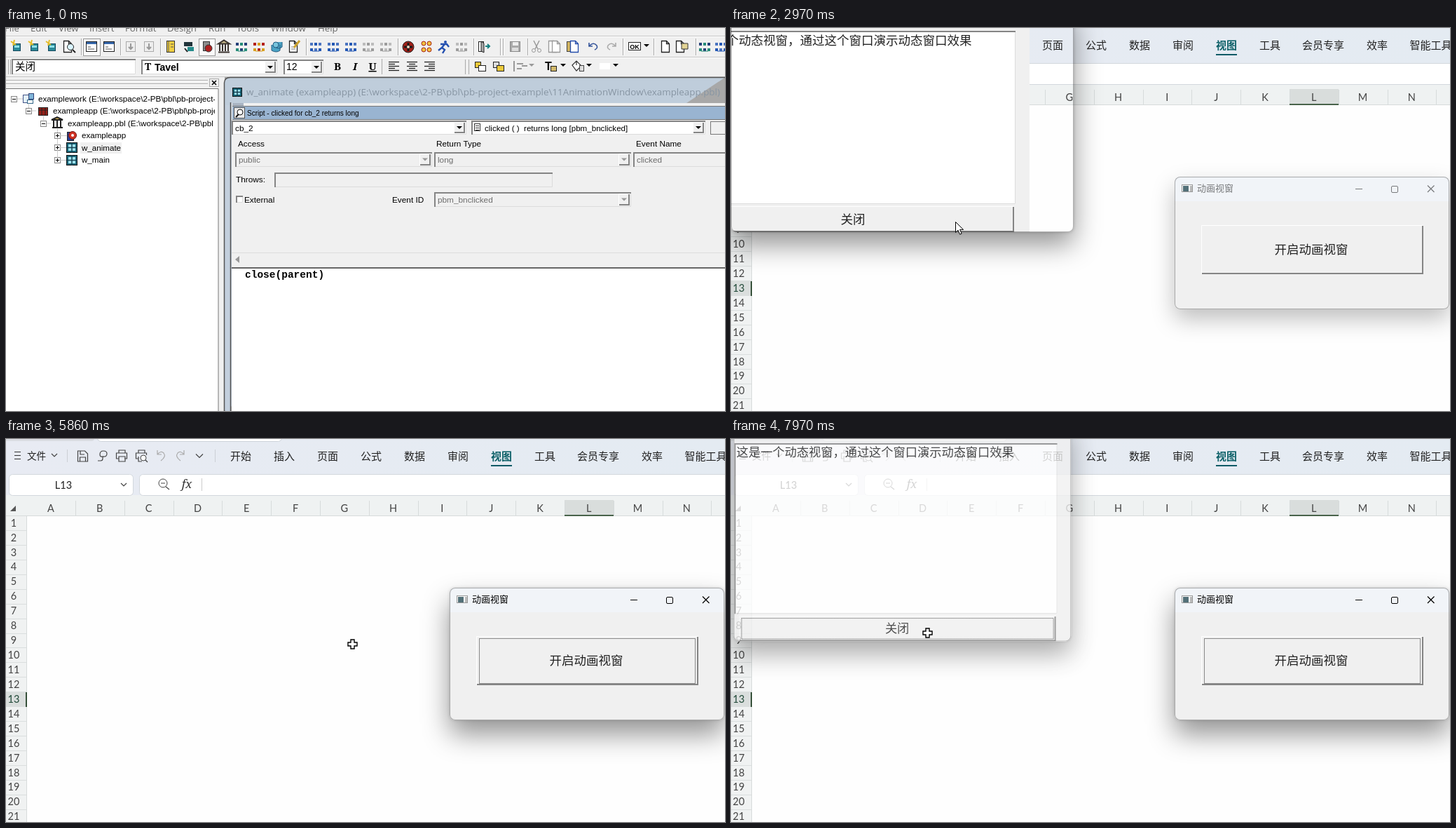
Recreate the animation shown at these times as an HTML page. Size 1026 px wide and 546 px high, loop 8000 ms.

```html
<!DOCTYPE html>
<html lang="zh">
<head>
<meta charset="utf-8">
<title>Window animation demo</title>
<style>
html, body { margin: 0; width: 100%; height: 100%; overflow: hidden; background: #fff; }
svg { position: absolute; left: 0; top: 0; overflow: visible; }
text { white-space: pre; }
.ui { font-family: "Liberation Sans", sans-serif; }
.cjk { font-family: "Noto Sans CJK SC", "Noto Sans CJK", sans-serif; }
.win { position: absolute; border-radius: 8px; }
.clip { position: absolute; inset: 0; border-radius: 8px; overflow: hidden; }
.edge { position: absolute; inset: 0; border-radius: 8px; box-shadow: inset 0 0 0 1px rgba(0,0,0,.3); }
#dialog { left: 633px; top: 212px; width: 392px; height: 189px; }
#popup { left: 0; top: -30px; width: 489px; height: 321px; box-shadow: 0 18px 38px rgba(0,0,0,.42), 0 0 4px rgba(0,0,0,.2); }
#content { position: absolute; inset: 0; }
</style>
</head>
<body>
<svg id="ide" class="ui" width="1026" height="546"></svg>
<svg id="sheet" width="1026" height="546"></svg>
<div id="dialog" class="win"><div class="clip"><svg id="dialogArt" class="cjk" width="392" height="189"></svg></div><div class="edge"></div></div>
<div id="popup" class="win"><div class="clip"><div id="content"><svg id="popupArt" class="cjk" width="489" height="321"></svg></div></div><div class="edge"></div></div>
<svg id="mouse" width="1" height="1"></svg>
<script>
const $ = id => document.getElementById(id);
const R = (x, y, w, h, fill, stroke, more = '') => {
  const o = stroke ? .5 : 0;
  return `<rect x="${x + o}" y="${y + o}" width="${w - 2 * o}" height="${h - 2 * o}" fill="${fill}" ${stroke ? `stroke="${stroke}"` : ''} ${more}/>`;
};
const P = (d, stroke = '#333', width = 1, fill = 'none') =>
  `<path d="${d}" stroke="${stroke}" stroke-width="${width}" fill="${fill}"/>`;
const C = (x, y, r, fill, stroke = 'none') => `<circle cx="${x}" cy="${y}" r="${r}" fill="${fill}" stroke="${stroke}"/>`;
const T = (x, y, s, size, fill = '#000', more = '') =>
  `<text x="${x}" y="${y}" font-size="${size}" fill="${fill}" ${more}>${s}</text>`;
const MID = 'text-anchor="middle"', BOLD = 'font-weight="700"';

// Classic 3D edges
const sunken = (x, y, w, h, fill = '#fff') => R(x, y, w, h, fill) +
  P(`M${x + 1} ${y + h}V${y + 1}H${x + w}`, '#858585', 2) + P(`M${x + 2} ${y + h - .5}H${x + w - .5}V${y + 2}`, '#dcdcdc');
const raised = (x, y, w, h) => R(x, y, w, h, '#f0f0f0') +
  P(`M${x + .5} ${y + h}V${y + .5}H${x + w}`, '#fff') + P(`M${x + 1} ${y + h - 1}H${x + w - 1}V${y + 1}`, '#858585', 2);
const arrow = (x, y, c = '#000') => P(`M${x - 4} ${y - 2}h8l-4 4z`, 'none', 0, c);
const combo = (x, y, w, h, s, off) => sunken(x, y, w, h, off ? '#f0f0f0' : '#fff') +
  raised(x + w - 18, y + 2, 16, h - 4) + arrow(x + w - 10, y + h / 2, off ? '#999' : '#000') +
  T(x + 5, y + h / 2 + 4.5, s, 11.8, off ? '#6d6d6d' : '#000');
const chevron = (x, y, r = 4) => P(`M${x - r} ${y - r / 2}l${r} ${r}l${r} ${-r}`, '#444', 1.2);

// Toolbar icons, drawn around (x, 27)
const dots = (x, a, b) => [0, 1, 2, 3, 4, 5].map(i =>
  R(x - 8 + i % 3 * 6, 21 + (i / 3 | 0) * 8, 4, 4, i % 2 ? a : b)).join('') + P(`M${x - 5} 33h10`, a);
const page = (x, c = '#222') => P(`M${x - 5.5} 18.5h7l4 4v12h-11zM${x + 1.5} 18.5v4h4`, c, 1.3, '#fff');
const icons = {
  n: x => R(x - 5, 22, 11, 11, '#2a8a98', '#184a60') + R(x - 3, 25, 7, 3, '#8fe0e8') + P(`M${x - 8} 19l7 5M${x - 3} 17l-2 8`, '#e6bd28', 2),
  m: x => page(x - 2) + C(x + 2, 27, 4.5, '#d9f5ff', '#222') + P(`M${x + 5} 31l4 4`, '#222', 2),
  w: x => R(x - 8, 19, 16, 15, '#fff', '#222') + R(x - 7, 20, 14, 3, '#3566aa') + P(`M${x - 5} 27h4M${x - 5} 30h9`, '#555'),
  x: x => R(x - 7, 19, 14, 15, '#eee', '#aaa') + P(`M${x} 22v8M${x - 3} 27l3 3l3-3`, '#999', 2),
  b: x => R(x - 6, 18, 12, 17, '#f0cf42', '#333') + P(`M${x - 3} 19v15M${x} 23h4M${x} 27h4`, '#555'),
  s: x => R(x - 7, 20, 12, 6, '#20333a') + R(x - 2, 27, 9, 6, '#258b8b') + P(`M${x - 6} 29l4 5`, '#222', 2),
  h: x => P(`M${x - 8} 22.5l8-5l8 5zM${x - 8} 34.5h16M${x - 6} 23v10M${x - 2} 23v10M${x + 2} 23v10M${x + 6} 23v10`, '#3b3430', 2, '#c9b98b'),
  t: x => R(x - 6, 19, 10, 14, '#8d8d8d', '#333') + C(x + 2, 29, 5, '#b02020', '#333'),
  g: x => dots(x, '#268c78', '#263f78'),
  a: x => dots(x, '#d8a020', '#b32018'),
  k: x => P(`M${x - 7} 24v8q7 4 12 0v-8M${x - 2} 20v7q6 4 10 0v-7`, '#245a80', 1, '#4aa3c4') + C(x - 1, 24, 4, '#77c4dc', '#245a80'),
  e: x => page(x - 1) + P(`M${x - 4} 27h6M${x - 4} 30h6`, '#777') + P(`M${x} 28l8-10`, '#cda32c', 3),
  d: x => dots(x, '#2458b4', '#4b74c0'),
  q: x => dots(x, '#9c9c9c', '#bcbcbc'),
  c: x => C(x, 27, 8, '#a32018', '#222') + P(`M${x - 6} 27h12M${x} 21v12`, '#1a1a1a', 3) + C(x, 27, 2, '#e6d6c0'),
  r: x => [[-4, 22], [4, 22], [-4, 31], [4, 31]].map(p => C(x + p[0], p[1], 3, '#f0c33d', '#a62018')).join(''),
  u: x => C(x + 3, 20, 2, '#2450b0') + P(`M${x + 2} 23l-4 5l4 3l-3 5M${x - 2} 28l-5 4M${x - 4} 23h9l3 4`, '#2450b0', 2.4),
  v: x => R(x - 7, 19, 8, 15, '#fff', '#222') + P(`M${x - 3} 19l4 3v13l-4-2z`, '#222', 1, '#aaa') + P(`M${x + 3} 26h6M${x + 6} 23l3 3l-3 3`, '#168080', 2),
  f: x => R(x - 7, 19, 15, 15, '#aaa', '#888') + R(x - 3, 20, 8, 5, '#eee') + R(x - 4, 28, 9, 5, '#ddd'),
  j: x => P(`M${x - 4} 18l6 12M${x + 4} 18l-6 12`, '#999', 1.5) + C(x - 4, 32, 2.5, 'none', '#999') + C(x + 4, 32, 2.5, 'none', '#999'),
  y: x => page(x - 2, '#999') + page(x + 3, '#999'),
  z: x => R(x - 8, 19, 13, 15, '#d2b45f', '#444') + page(x + 3, '#234caa'),
  l: x => P(`M${x - 6} 21v5h5M${x - 6} 26q6-7 11-1q2 4-3 6`, '#34549a', 1.6),
  o: x => P(`M${x + 6} 21v5h-5M${x + 6} 26q-6-7-11-1q-2 4 3 6`, '#aaa', 1.6),
  p: x => page(x),
  i: x => page(x - 3) + P(`M${x - 1} 22h9v8h-9z`, '#333', 1, '#e3d495')
};
const bar = '15n 40n 65n 90m 122w 147w 178x 204x 235b 261s 287t 311h 336g 361a 386k 411e 442d 467d 492d 517q 542q 574c 600r 624u 650q 681v 726f 757j 782y 808z 838l 864o 941p 965i 997g 1020d';

function drawIde() {
  const rule = x => P(`M${x + .5} 15v24`, '#aaa') + P(`M${x + 1.5} 15v24`, '#fff');
  let s = R(0, 0, 1026, 546, '#f0f0f0');
  s += '<g font-family="Open Sans, sans-serif">';
  'File:-2 Edit:35 View:75 Insert:119 Format:170 Design:230 Run:289 Tools:329 Window:378 Help:445'.split(' ')
    .forEach(m => { const [w, x] = m.split(':'); s += T(x, 5, w, 13.2, '#666'); });
  s += '</g>' + P('M0 11.5H1026M0 41.5H1026M0 69.5H1026', '#c6c6c6') + P('M0 12.5H1026M0 42.5H1026', '#fff');
  s += R(110, 15, 25, 25, '#fafafa', '#999') + R(275, 15, 24, 25, '#fafafa', '#999');
  bar.split(' ').forEach(k => s += icons[k.slice(-1)](parseInt(k)));
  s += [107, 163, 220, 428, 559, 667, 705, 709, 744, 880, 924, 984].map(rule).join('');
  s += R(888, 20, 18, 12, '#fff', '#222') + T(897, 29.5, 'OK', 9, '#000', MID + BOLD) + arrow(914, 25);

  s += P('M3.5 45v21M6.5 45v21M660.5 45v21M655.5 45v21', '#aaa');
  s += sunken(8, 44, 177, 22) + T(13, 60, '关闭', 14.5, '#000', 'class="cjk"');
  s += sunken(193, 45, 194, 21) + raised(369, 47, 16, 17) + arrow(377, 56) + T(198, 60, 'T', 14, '#000', BOLD + 'font-family="Noto Serif,serif"') +
    T(212, 61, 'Tavel', 14, '#000', BOLD);
  s += sunken(396, 45, 57, 21) + raised(435, 47, 16, 17) + arrow(443, 56) + T(400, 60, '12', 14);
  s += T(473, 60, 'B', 15, '#000', BOLD + 'text-anchor="middle" font-family="Noto Serif,serif"') +
    T(498, 60, 'I', 15, '#000', BOLD + 'text-anchor="middle" font-style="italic" font-family="Noto Serif,serif"') +
    T(523, 60, 'U', 15, '#000', MID + ' font-family="Noto Serif,serif" text-decoration="underline"' + BOLD);
  [546, 572, 597].forEach((x, k) => {
    for (let i = 0; i < 5; i++) { const w = i % 2 ? 9 : 15; s += P(`M${x + (15 - w) * k / 2} ${48.5 + i * 3}h${w}`, '#222', 1.3); }
  });
  s += P('M536.5 44v22', '#aaa');
  [676, 702].forEach((x, i) => s += R(x - 7, 48, 9, 9, i ? '#ddd' : '#ecc93a', '#222') + R(x - 2, 53, 11, 9, i ? '#ecc93a' : '#fff', '#222'));
  s += P('M725 47v15M729 51h9M729 58h7M744 54h-8', '#999', 2) + arrow(750, 53, '#999');
  s += T(769, 60, 'T', 16, '#000', BOLD) + R(777, 54, 9, 8, '#d2b96a', '#222') + arrow(795, 53);
  s += P('M808 53l6-6l7 7l-7 7zM814 47v6', '#333', 1.2, '#fff') + R(818, 53, 7, 9, '#ddd', '#444') + arrow(832, 53) + R(847, 50, 15, 9, '#fff') + arrow(870, 53);

  // Tree panel
  s += R(0, 70, 304, 476, '#f0f0f0') + P('M0 74.5H288M0 79.5H288', '#aaa') + P('M0 75.5H288M0 80.5H288', '#fff');
  s += R(290, 72, 14, 12, '#f0f0f0', '#aaa') + P('M294 75l6 6m0-6l-6 6', '#000', 1.6);
  s += R(0, 86, 303, 460, '#fff') + P('M0 86.5H303V546', '#777');
  s += `<g stroke-dasharray="1 1">${P('M11.5 101H24M32.5 109V118H43M53.5 126V136H64M73.5 144V188M73 153.5H86M73 170.5H86M73 188.5H86', '#999')}</g>`;
  const node = (x, y, open) => R(x - 4, y - 4, 9, 9, '#fff', '#888') + P(`M${x - 2} ${y + .5}h5` + (open ? '' : `M${x + .5} ${y - 2}v5`), '#000');
  s += node(11, 101, 1) + node(32, 118, 1) + node(53, 136, 1) + node(73, 153) + node(73, 170) + node(73, 188);
  s += R(24, 95, 9, 12, '#e4f2fa', '#458') + R(32, 93, 8, 9, '#7fb4d8', '#347') + R(30, 102, 9, 6, '#fff', '#368');
  s += R(46, 113, 14, 12, '#952018', '#222') + P('M46 117h14M51 113v12M56 113v12', '#222');
  s += P('M65 131l8-4l8 4zM66 142h15M68 132v9M73 132v9M78 132v9', '#222', 2, '#cba94e');
  s += R(87, 148, 10, 13, '#263f9a', '#222') + C(95, 153, 5.5, '#d03022', '#701818') + C(95, 153, 2, '#fff');
  const winIcon = (x, y, w, h) => R(x, y, w, h, '#176578', '#111') + R(x + 3, y + 3, w - 6, h - 6, '#9fe4f0') + P(`M${x + w / 2} ${y}v${h}M${x} ${y + h / 2}h${w}`, '#164050', 1.5);
  s += winIcon(86, 163, 16, 15) + winIcon(86, 181, 16, 15) + R(106, 163, 59, 16, '#f0f0f0');
  s += `<svg width="298" height="546" overflow="hidden" style="overflow:hidden">` + T(46, 105, 'examplework (E:\\workspace\\2-PB\\pbl\\pb-project-example', 11.7) +
    T(67, 122, 'exampleapp (E:\\workspace\\2-PB\\pbl\\pb-project-example', 11.7) + T(88, 140, 'exampleapp.pbl (E:\\workspace\\2-PB\\pbl', 11.7) +
    T(108, 157, 'exampleapp', 11.6) + T(108, 175, 'w_animate', 11.6) + T(108, 192, 'w_main', 11.6) + '</svg>';

  // Script window
  s += R(304, 70, 722, 476, '#a8a8a8') + R(304, 70, 8, 476, '#f0f0f0') + P('M311.5 546V78Q312 70.5 320 70.5H1026', '#555', 1.5, '#bfcddb');
  s += R(313, 110, 7, 436, '#c3cfdd') + P('M320.5 106V546', '#555', 1.5) + R(322, 107, 704, 439, '#f0f0f0');
  s += winIcon(323, 85, 14, 13) + T(343, 96, 'w_animate (exampleapp) (E:\\workspace\\2-PB\\pbl\\pb-project-example\\11AnimationWindow\\exampleapp.pbl)', 13.4, '#8795a3', 'font-family="Open Sans, sans-serif"');
  s += R(323, 107, 16, 4, '#a9b4c2') + R(323, 112, 703, 19, '#99b4d1') + P('M323 111.5H1026M323 130.5H1026', '#777');
  s += R(325, 113, 16, 16, '#e8e8e8', '#555') + C(334, 120, 4, '#fff', '#111') + P('M328 127l4-4', '#111', 2) + T(344, 125, 'Script - clicked for cb_2 returns long', 10);
  s += combo(322, 132, 335, 20, 'cb_2') + combo(664, 132, 334, 20, '') + R(668, 136, 9, 11, '#fff', '#333') + P('M670 139.5h5M670 142.5h5M670 145.5h5', '#333') +
    T(683, 146.5, 'clicked ( )  returns long [pbm_bnclicked]', 11.6) + R(1005, 133, 30, 19, '#f0f0f0', '#777');
  s += T(331, 169, 'Access', 11.8) + T(614, 169, 'Return Type', 11.8) + T(899, 169, 'Event Name', 11.8);
  s += combo(327, 177, 281, 21, 'public', 1) + combo(611, 177, 281, 21, 'long', 1) + combo(895, 177, 160, 21, 'clicked', 1);
  s += T(328, 220, 'Throws:', 11.8) + sunken(383, 206, 397, 21, '#f0f0f0') + sunken(328, 239, 10, 10) + T(340, 249, 'External', 11.8) +
    T(551, 249, 'Event ID', 11.8) + combo(611, 234, 281, 21, 'pbm_bnclicked', 1);
  s += P('M322 320.5H1026', '#ddd') + P('M333 325v10l-6-5z', 'none', 0, '#999') + R(322, 341, 704, 205, '#fff') + P('M322 342H1026', '#666', 2);
  s += T(341, 356, 'close(parent)', 14.5, '#000', BOLD + 'font-family="Liberation Mono, monospace"');
  s += '<g id="hover">' + R(612, 15, 25, 25, 'none', '#777') + '</g>';
  $('ide').innerHTML = s;
}

function drawSheet() {
  const colW = 69.8, rowH = 20.93;
  let s = '<defs><linearGradient id="top"><stop offset="0" stop-color="#e8ebf3"/><stop offset="1" stop-color="#e4ebf2"/></linearGradient></defs>';
  s += R(0, 0, 1026, 546, '#fefefe') + R(0, 0, 1026, 84, 'url(#top)') + R(0, 80, 1026, 30, '#eff2f2');
  s += R(-5, -8, 131, 11, '#dadde2', '', 'rx="4"') + R(130, -8, 264, 12, '#fff', '#cdd3da', 'rx="5"');
  s += '<g class="cjk">' + P('M12 18.5h9M12 23.5h9M12 28.5h9') + T(30, 29, '文件', 13.6, '#222') + chevron(69, 23);
  s += P('M87.5 15v18M298.5 15v18', '#ccd0d5');
  s += P('M102.5 17h10l4 4v11h-14zM106 17v5h6M105.500 32v-6h8v6', '#444', 1.2);
  s += P('M131 31h4q3 0 3-3v-3q-4 1-4-3q0-5 5-5q5 0 5 4q0 5-6 4', '#444', 1.2);
  s += P('M161 20v-4h9v4M161 28h-3.500v-8h15v8h-3.500M161 25h9v7h-9z', '#444', 1.2);
  s += P('M189 20v-4h9v4M189 28h-3.500v-8h15v3M189 25v7h5', '#444', 1.2) + C(196, 27, 4, '#fff', '#444') + P('M199 30l3 3', '#444', 1.2);
  s += P('M216 16v6h6M216 22q5-6 9-2q4 5-4 11', '#aaa', 1.2) + P('M254 16v6h-6M254 22q-5-6-9-2q-4 5 4 11', '#aaa', 1.2) + chevron(276, 24, 5);
  '开始:335 插入:397 页面:459 公式:521 数据:583 审阅:645 工具:769 会员专享:845 效率:922 智能工具箱:1006'.split(' ')
    .forEach(m => { const [w, x] = m.split(':'); s += T(x, 30, w, 15, '#222', MID); });
  s += T(707, 30, '视图', 15, '#0d6068', MID + BOLD) + R(692, 37, 30, 2, '#0d5a66') + '<g id="tabHover">' + R(569, 37, 29, 2, '#aaa') + '</g></g>';
  s += R(4, 50, 178, 31, '#fff', '#d3d8dd', 'rx="5"') + R(190, 50, 850, 31, '#fff', '#d3d8dd', 'rx="5"');
  s += '<g font-family="Lato, sans-serif">' + T(82, 71, 'L13', 14.5, '#222', MID) + chevron(168, 65);
  s += C(224, 63, 6, 'none', '#444') + P('M221 63h6M228 68l5 4', '#444', 1.2) + P('M279.500 56v18', '#ccc');
  s += T(258, 70, 'fx', 17, '#333', MID + ' font-style="italic" font-family="Noto Serif, serif"');
  s += R(797, 87, 70, 23, '#d9dddc') + R(0, 110, 29, 436, '#f0f2f2');
  for (let i = 0; i < 14; i++)
    s += T(64 + i * colW, 104, String.fromCharCode(65 + i), 14.5, '#444', MID) + P(`M${99.5 + Math.round(i * colW)} 88v21`, '#d7dbdb');
  s += R(0, 361, 29, 21, '#dadedd');
  for (let i = 0; i < 21; i++)
    s += T(11, 124.7 + i * rowH, i + 1, 14.5, i === 12 ? '#234b3a' : '#444', MID) + P(`M0 ${Math.round(130 + i * rowH) + .5}h29`, '#dadede');
  s += P('M0 109.5H1026M29.500 110V546', '#d7dbdb') + R(797, 108, 70, 2, '#48634a') + R(28, 361, 2, 21, '#36513a');
  s += P('M14 95v8H6z', 'none', 0, '#555') + '</g>';
  $('sheet').innerHTML = s;
}

function drawWindows() {
  const dotted = (x, y, w, h) => `<g class="focus">${R(x, y, w, h, 'none', '#222', 'stroke-dasharray="1 1"')}</g>`;
  $('dialogArt').innerHTML = R(0, 0, 392, 189, '#f0f0f0') + `<g id="caption">${R(0, 0, 392, 35, '#f1f4f8')}` +
    R(10, 11, 16, 11, '#fff', '#999') + R(12, 13, 8, 8, '#537078') + R(22, 13, 3, 8, '#bbb') + '</g>' +
    `<g id="marks">${T(32, 21, '动画视窗', 13)}${P('M258 17.500h10M361 12.500l9.500 9.500m0-9.500l-9.500 9.500', '#000', 1.2)}${R(309, 13, 10, 10, 'none', '#000', 'rx="1.5"')}</g>` +
    raised(38, 69, 317, 70) + T(195, 109.5, '开启动画视窗', 17.5, '#222', MID) + dotted(42, 72, 309, 65);
  $('popupArt').innerHTML = R(0, 0, 489, 321, '#f0f0f0') + R(0, 0, 489, 29, '#f3f3f3') + sunken(1, 34, 468, 247) +
    T(4, 53.5, '这是一个动态视窗，通过这个窗口演示动态窗口效果', 17.5, '#222') +
    raised(8, 284, 459, 37) + T(237, 308.5, '关闭', 17.5, '#222', MID) + `<g id="closeFocus">${dotted(11, 287, 453, 31)}</g>`;
  $('mouse').innerHTML = `<g id="pointer">${P('M0 0v15l3.500-3.300l2.600 6l2.500-1.100l-2.500-5.700h5z', '#000', 1, '#fff')}</g>` +
    `<g id="cross">${P('M-2.500-6.500h5v4h4v5h-4v4h-5v-4h-4v-5h4z', '#000', 1.4, '#fff')}</g>`;
}

const LOOP = 8000;
// Each showing: reveal style, open time, close time
const shows = [['slide', 2100, 3566], ['center', 4430, 5580], ['slide', 6573, 7930]];
// Pointer stops: time, x, y
const path = [[70, 830, 372], [800, 621, 20], [1040, 621, 20], [1260, 610, 37], [1700, 730, 315], [2250, 730, 315], [2620, 553, 290],
  [2970, 320, 276], [3400, 345, 272], [3730, 354, 275], [4220, 706, 328], [4560, 706, 328], [5040, 358, 296], [5320, 330, 275],
  [5680, 335, 275], [6130, 731, 317], [6640, 731, 317], [7030, 472, 276], [7600, 280, 276], [8000, 280, 276]];
const clamp = v => Math.max(0, Math.min(1, v));

function pointerAt(t) {
  const i = Math.max(1, path.findIndex(k => k[0] >= t));
  const [a, b] = [path[i - 1], path[i]], p = clamp((t - a[0]) / (b[0] - a[0]));
  return [a[1] + (b[1] - a[1]) * p, a[2] + (b[2] - a[2]) * p];
}

function render(t) {
  const show = (id, on) => $(id).style.display = on ? '' : 'none';
  const onSheet = t >= 990, born = clamp((t - 1100) / 182);
  const [x, y] = pointerAt(t);
  show('ide', !onSheet);
  show('sheet', onSheet);
  show('hover', t > 740);
  show('tabHover', t > 1160 && t < 1330);

  const now = shows.find(s => t >= s[1] && t < s[2] + 200);
  const closing = now ? clamp((t - now[2]) / 200) : 0;
  const active = !now || t >= now[2] - 30;

  show('dialog', born > 0);
  const d = $('dialog').style;
  d.transform = `scale(${.9 + .1 * born})`;
  d.opacity = clamp(born * 2);
  d.boxShadow = active ? '0 20px 38px rgba(0,0,0,.42), 0 0 4px rgba(0,0,0,.15)' : '0 14px 32px rgba(0,0,0,.25)';
  $('marks').style.opacity = active ? 1 : .5;
  document.querySelector('#dialogArt .focus').style.display = active ? '' : 'none';

  show('popup', now);
  if (now) {
    const p = clamp((t - now[1]) / 1000), slide = now[0] === 'slide';
    $('popup').style.opacity = 1 - closing;
    $('popup').style.transform = `scale(${1 - .075 * closing})`;
    $('content').style.transform = slide ? `translateX(${Math.round((p - 1) * 489)}px)` : '';
    $('content').style.clipPath = slide ? '' : `inset(${50 - 50 * p}%)`;
    show('closeFocus', t >= now[2] - 30);
  }

  const overDialog = x > 633 && y > 212 && y < 401;
  const overPopup = now && !closing && x < 489 && y < 291;
  const plain = !onSheet || y < 87 || overDialog || overPopup;
  show('mouse', t >= 70);
  show('pointer', plain);
  show('cross', !plain);
  $('mouse').style.transform = `translate(${Math.round(x) + .5}px, ${Math.round(y) + .5}px)`;
}

drawIde();
drawSheet();
drawWindows();
const start = performance.now();
function tick() {
  render((performance.now() - start) % LOOP);
  requestAnimationFrame(tick);
}
tick();
</script>
</body>
</html>
```
